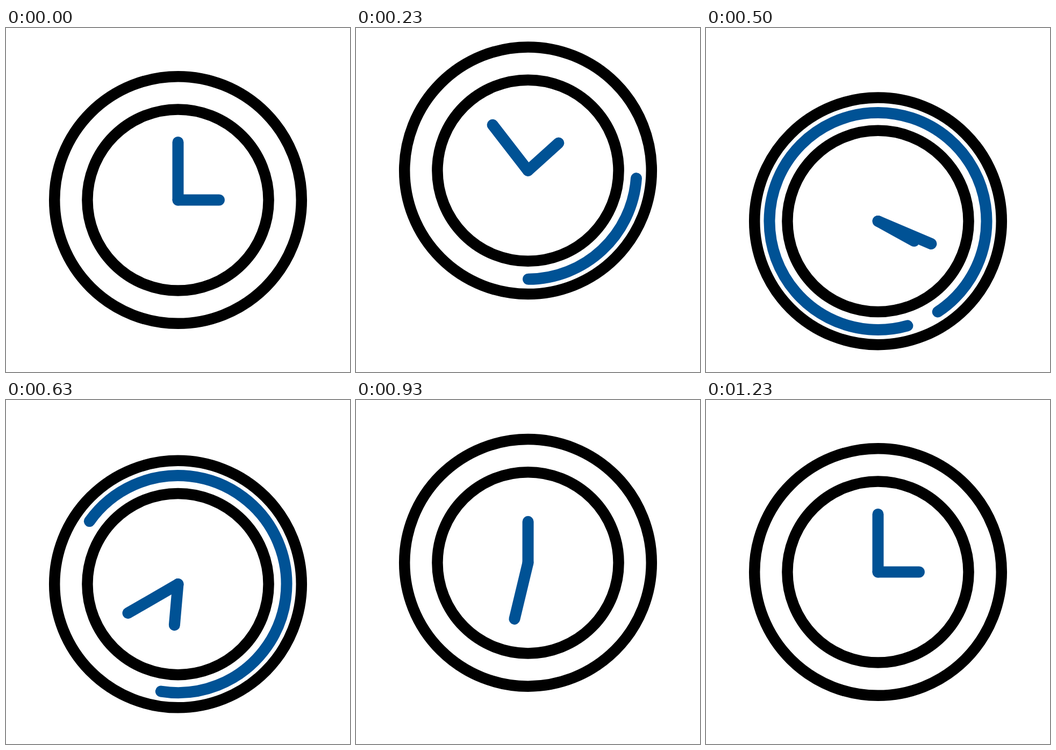
These frames come from a looping animation (640 by 640 pixels, 1.67 s). An HTML page:

```html
<!DOCTYPE html>
<html lang="en">
<head>
<meta charset="utf-8">
<title>Clock</title>
<style>
  html, body { margin: 0; width: 100%; height: 100%; overflow: hidden; background: #fff; }
  svg { display: block; width: 100%; height: 100%; }
</style>
</head>
<body>
<svg viewBox="0 0 640 640" fill="none" stroke-linecap="round">
  <g id="clock">
    <g stroke="#000" stroke-width="20.5">
      <circle r="229.8"/>
      <circle r="168.6"/>
    </g>
    <g stroke="#005295" stroke-width="21">
      <path id="arc"/>
      <path id="hour" d="M0 0V-76.5"/>
      <path id="minute" d="M0 0V-107.5"/>
    </g>
  </g>
</svg>
<script>
const LOOP = 1670;
const FPS = 30;
const ARC_R = 202;
const [clock, arc, hour, minute] =
  ["clock", "arc", "hour", "minute"].map(id => document.getElementById(id));

// Cubic bezier easing from (0,0) to (1,1) with flat ends.
function bezier(x1, x2) {
  return p => {
    let lo = 0, hi = 1, u = p;
    for (let i = 0; i < 24; i++) {
      u = (lo + hi) / 2;
      const v = 1 - u;
      const x = 3 * x1 * u * v * v + 3 * x2 * u * u * v + u * u * u;
      if (x < p) lo = u; else hi = u;
    }
    return u * u * (3 - 2 * u);
  };
}

const inOut = bezier(0.42, 0.58);
const minuteEase = bezier(0.366, 0.698);
const hourEase = bezier(0.42, 0.682);

// Keys are [time, value, easing into this key].
function track(keys, t) {
  let [t0, v0] = keys[0];
  for (const [t1, v1, ease = inOut] of keys) {
    if (t <= t0) return v0;
    if (t < t1) return v0 + (v1 - v0) * ease((t - t0) / (t1 - t0));
    t0 = t1;
    v0 = v1;
  }
  return v0;
}

const height = [[0, 320], [8, 263.5], [16, 362.5], [24.15, 291.9], [33, 320]];
const minuteTurn = [[0, 0], [5, -45], [37, 720, minuteEase]];
const hourTurn = [[0, 90], [5, 45], [37, 450, hourEase]];
const arcTurn = [[4.3, 90], [25, 210]];
const arcHead = [[2.2, 0], [16.4, 360]];
const arcTail = [[13.2, 0], [27.9, 360]];

function point(deg) {
  const a = deg * Math.PI / 180;
  return (ARC_R * Math.sin(a)).toFixed(2) + " " + (-ARC_R * Math.cos(a)).toFixed(2);
}

function arcPath(from, to) {
  if (to - from < 0.05) return "";
  const mid = (from + to) / 2;
  const step = a => `A${ARC_R} ${ARC_R} 0 0 1 ${point(a)}`;
  return "M" + point(from) + step(mid) + step(to);
}

function draw(ms) {
  const t = Math.floor((ms % LOOP + 4) * FPS / 1000);
  const turn = track(arcTurn, t);
  clock.setAttribute("transform", `translate(320 ${track(height, t)})`);
  minute.setAttribute("transform", `rotate(${track(minuteTurn, t)})`);
  hour.setAttribute("transform", `rotate(${track(hourTurn, t)})`);
  arc.setAttribute("d", arcPath(turn + track(arcTail, t), turn + track(arcHead, t)));
}

let start;
function tick(now) {
  start ??= now;
  draw(Math.max(0, now - start));
  requestAnimationFrame(tick);
}
draw(0);
requestAnimationFrame(tick);
</script>
</body>
</html>
```
